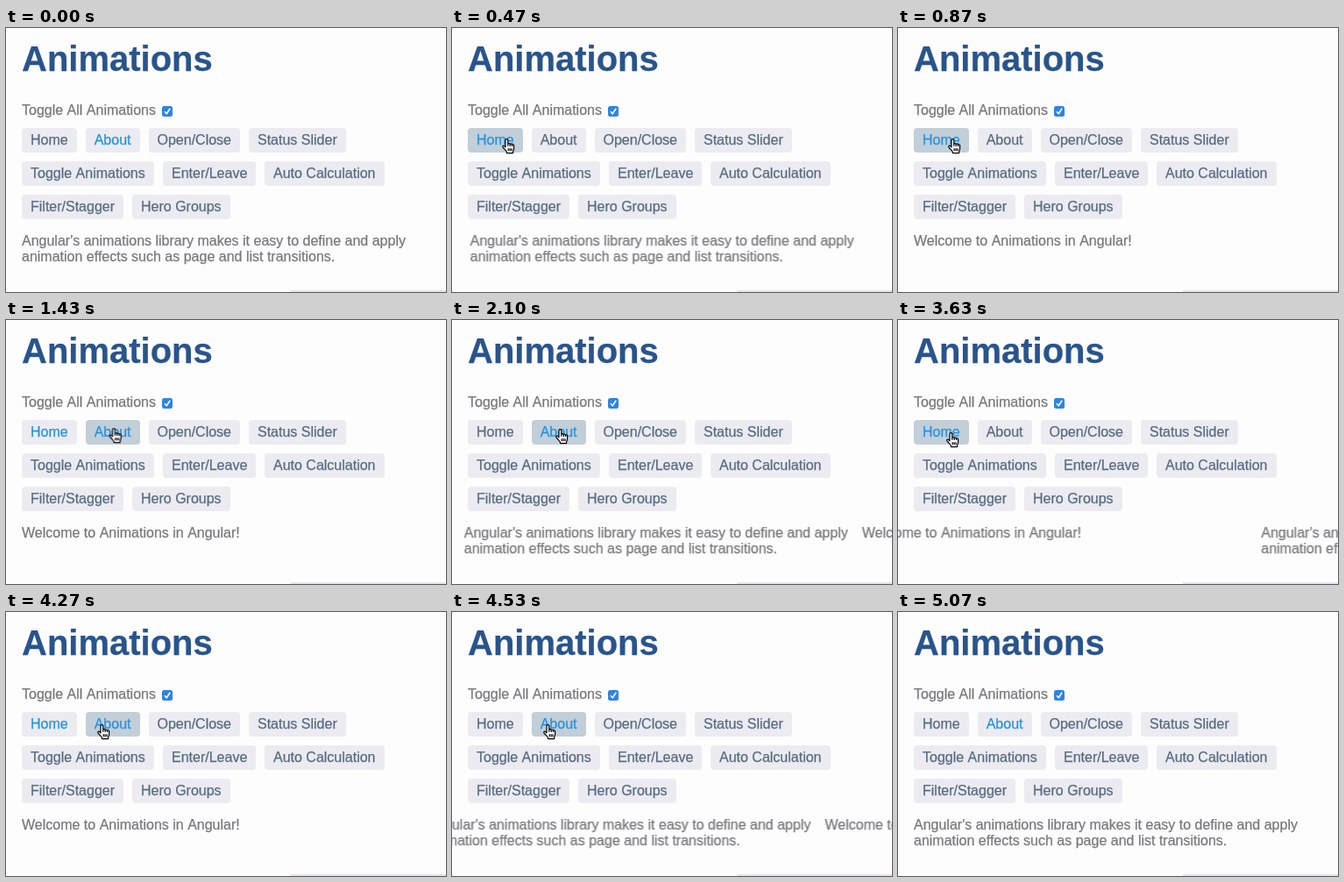
Write an HTML page that moves like this. It is 502 px wide and 301 px high and loops after 5.46 s.

```html
<!DOCTYPE html>
<html lang="en">
<head>
<meta charset="utf-8">
<title>Animations</title>
<style>
  :root {
    --text: #77777c;
    --link: #566b80;
    --active: #2391e0;
    --button: #ebebf1;
    --hover: #c2ced8;
  }
  html, body { margin: 0; width: 100%; height: 100%; overflow: hidden; background: #fdfdfd; }
  svg { display: block; font: 16px "Liberation Sans", Arial, sans-serif; color: var(--text); fill: currentColor; }
  text { stroke: currentColor; stroke-width: .25px; }
  .title { font-size: 40px; font-weight: bold; color: #29548c; }
  .button rect { color: var(--button); }
  .button text { color: var(--link); }

  .page, .cursor, .cursor *, .button * { animation: 5460ms linear infinite; }
  .about-page { animation-name: about-page; }
  .home-page { animation-name: home-page; }
  .cursor { animation-name: move; }
  .arrow { animation-name: arrow; animation-timing-function: step-end; }
  .hand { animation-name: hand; animation-timing-function: step-end; }
  .button * { animation-timing-function: step-end; }
  .home rect { animation-name: home-hover; }
  .home text { animation-name: home-link; }
  .about rect { animation-name: about-hover; }
  .about text { animation-name: about-link; }

  /* Pages slide right for 300 ms; the idle page is parked off stage. */
  @keyframes about-page {
    0% { transform: translateX(0); }
    8.608%, 62.637% { transform: translateX(0); animation-timing-function: ease-out; }
    14.103%, 68.132% { transform: translateX(454px); animation-timing-function: step-start; }
    14.104%, 33.387%, 68.133%, 78.937% { transform: translateX(-900px); animation-timing-function: step-start; }
    33.388%, 78.938% { transform: translateX(-454px); animation-timing-function: ease-out; }
    38.883%, 84.432%, 100% { transform: translateX(0); }
  }
  @keyframes home-page {
    0% { transform: translateX(-454px); }
    8.608%, 62.637% { transform: translateX(-454px); animation-timing-function: ease-out; }
    14.103%, 68.132% { transform: translateX(0); }
    33.388%, 78.938% { transform: translateX(0); animation-timing-function: ease-out; }
    38.883%, 84.432% { transform: translateX(454px); animation-timing-function: step-start; }
    38.884%, 84.433%, 100% { transform: translateX(-454px); }
  }

  @keyframes move {
    0%, .549% { transform: translate(130px, 4px); animation-timing-function: ease-in-out; }
    5.495%, 21.429% { transform: translate(57px, 126px); animation-timing-function: ease-in-out; }
    25.641% { transform: translate(117.5px, 123px); }
    33.388%, 43.956% { transform: translate(118px, 124px); animation-timing-function: ease-in-out; }
    51.282%, 72.344% { transform: translate(55px, 128px); animation-timing-function: ease-in-out; }
    77.839%, 100% { transform: translate(104px, 128px); }
  }
  @keyframes arrow {
    0%, 4.396%, 100% { opacity: 0; }
    .549% { opacity: 1; }
  }
  @keyframes hand {
    0%, 91.575%, 100% { opacity: 0; }
    4.396% { opacity: 1; }
  }

  @keyframes home-hover {
    0%, 23.077%, 74.872%, 100% { color: var(--button); }
    4.396%, 48.425% { color: var(--hover); }
  }
  @keyframes about-hover {
    0%, 47.729%, 91.575%, 100% { color: var(--button); }
    23.498%, 75.476% { color: var(--hover); }
  }
  @keyframes home-link {
    0%, 33.388%, 78.938%, 100% { color: var(--link); }
    4.396%, 48.425% { color: var(--active); }
  }
  @keyframes about-link {
    0%, 23.498%, 75.476%, 100% { color: var(--active); }
    8.608%, 62.637% { color: var(--link); }
  }
</style>
</head>
<body>
<!-- dx on a leading "A" cancels the font's kerning against the space -->
<svg width="502" height="301" viewBox="0 0 502 301">
  <text class="title" x="18" y="49">Animations</text>
  <text x="18" y="99">Toggle <tspan dx=".055em">All</tspan> <tspan dx=".055em">Animations</tspan></text>

  <rect x="178" y="89" width="12" height="12" rx="2.5" fill="#2f84e2"/>
  <path d="M181 95.3l2.2 2.5 4-6" fill="none" stroke="#fff" stroke-width="1.6"/>

  <g class="button home"><rect x="18" y="114" width="63" height="28" rx="4"/><text x="28" y="133">Home</text></g>
  <g class="button about"><rect x="91" y="114" width="62" height="28" rx="4"/><text x="100.7" y="133">About</text></g>
  <g class="button"><rect x="163" y="114" width="104" height="28" rx="4"/><text x="172.5" y="133">Open/Close</text></g>
  <g class="button"><rect x="277" y="114" width="111" height="28" rx="4"/><text x="287" y="133">Status Slider</text></g>
  <g class="button"><rect x="18" y="152" width="151" height="28" rx="4"/><text x="28" y="171">Toggle <tspan dx=".055em">Animations</tspan></text></g>
  <g class="button"><rect x="179" y="152" width="106" height="28" rx="4"/><text x="189" y="171">Enter/Leave</text></g>
  <g class="button"><rect x="295" y="152" width="137" height="28" rx="4"/><text x="305" y="171">Auto Calculation</text></g>
  <g class="button"><rect x="18" y="190" width="116" height="28" rx="4"/><text x="28" y="209">Filter/Stagger</text></g>
  <g class="button"><rect x="144" y="190" width="112" height="28" rx="4"/><text x="154" y="209">Hero Groups</text></g>

  <g class="page about-page">
    <text x="18" y="248">Angular's animations library makes it easy to define and apply</text>
    <text x="18" y="266">animation effects such as page and list transitions.</text>
  </g>
  <g class="page home-page">
    <text x="18" y="248">Welcome to <tspan dx=".055em">Animations</tspan> in <tspan dx=".055em">Angular!</tspan></text>
  </g>

  <rect x="325" y="299" width="177" height="2" fill="#eae0f1"/>

  <g class="cursor" fill="#fff" stroke="#000" stroke-linejoin="round">
    <path class="arrow" d="M5 0v14l3.2-3 2 4.8 2.2-1-2-4.6h4.4z" fill="#000" stroke="#fff"/>
    <path class="hand" stroke-width="1.2" d="M4 9.8V2a1.4 1.4 0 0 1 2.8 0v4.3a1.3 1.3 0 0 1 2.4.4 1.3 1.3 0 0 1 2.3.6 1.2 1.2 0 0 1 2.1 1v3.2c0 1.6-1 2.3-1 4v1.1H5.5v-1C5 14 2.5 12 1 9.8.3 8.4 1.9 7.6 2.8 8.6zM7.2 11.2v3M9.1 11.2v3M11 11.2v3M6.8 6v2.8M9.2 6.7v2.2M11.5 7.3v1.8"/>
  </g>
</svg>
</body>
</html>
```
